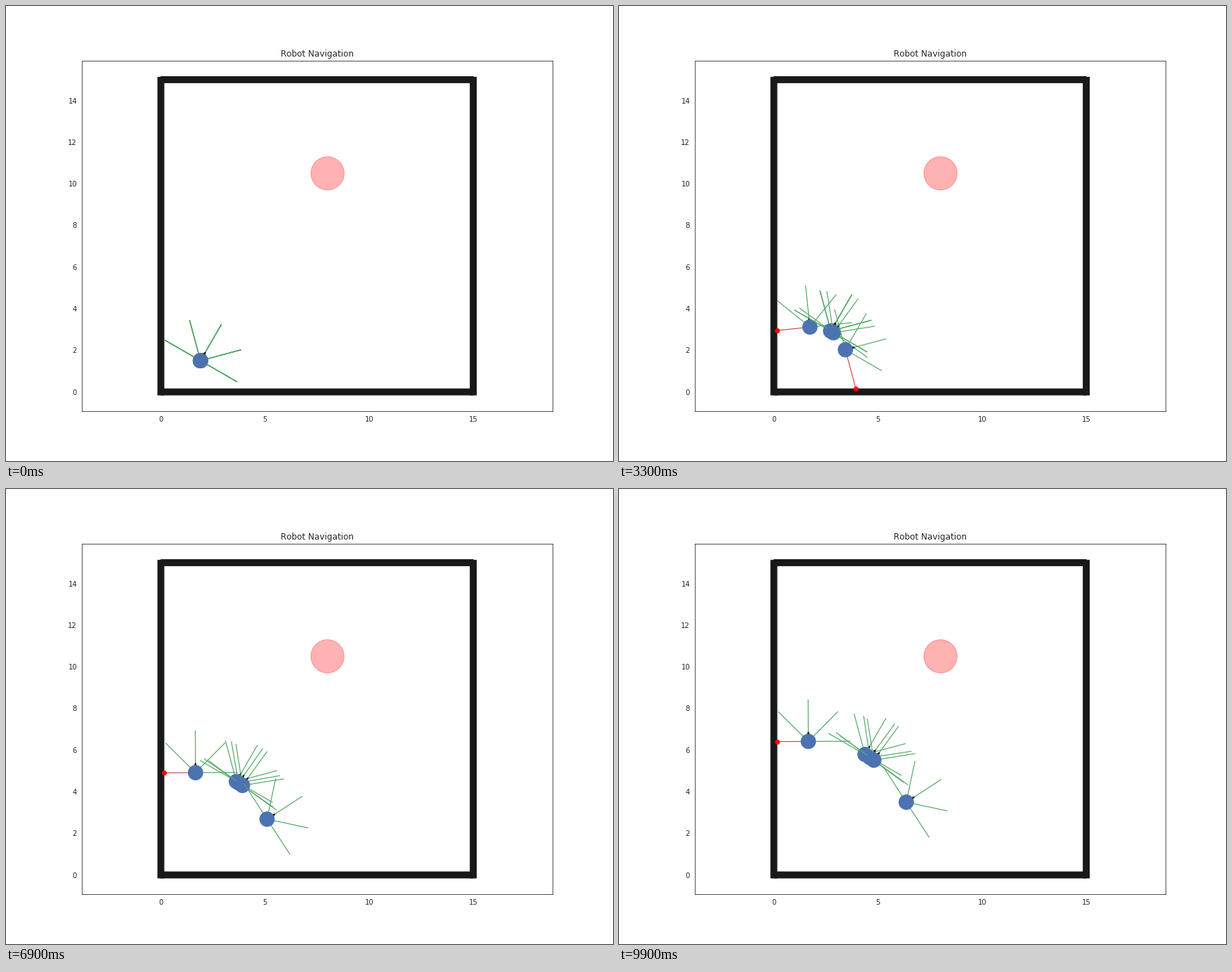
Recreate the animation shown at these times as a matplotlib script. Size 864 px wide and 648 px high, loop 10 s.

```python
import numpy as np
import matplotlib.pyplot as plt
from matplotlib.animation import FuncAnimation
from matplotlib.patches import Circle, Polygon, Rectangle

FRAMES, INTERVAL = 100, 100
START, SPEED = (1.9, 1.5), 0.05
RADIUS, REACH, WALL = 0.35, 2.0, 0.15
SENSORS = np.radians([-90, -45, 0, 45, 90])
BLUE, GREEN, RED, INK = "#4c72b0", "#55a868", "#c44e52", "0.15"

# Steering of each robot: (step, heading in degrees)
STEERING = [
    [(0, 60), (6, 102), (13, 102), (33, 96), (42, 96), (47, 90.3)],
    [(0, 60)],
    [(0, 60), (5, 58.5), (13, 58.5), (22, 60), (36, 60), (46, 56), (99, 53.5)],
    [(0, 60), (4, 54)],
    [(0, 60), (5, 15), (47, 15), (53, 21), (60, 30), (69, 33)],
]

plt.rcParams.update({"font.family": "DejaVu Sans", "text.color": INK,
                     "text.kerning_factor": 6,
                     "axes.edgecolor": INK, "axes.linewidth": 0.8})


def drive(keys):
    """Headings and positions for every step."""
    steps, angles = zip(*keys)
    heading = np.radians(np.interp(np.arange(FRAMES), steps, angles))
    moves = SPEED * np.column_stack([np.cos(heading), np.sin(heading)])
    path = np.vstack([START, START + np.cumsum(moves[:-1], axis=0)])
    return heading, path


def cast(pos, angle):
    """End point of a sensor ray and whether it meets a wall."""
    ray = REACH * np.array([np.cos(angle), np.sin(angle)])
    cut = 1.0
    for axis in (0, 1):
        if pos[axis] + ray[axis] < WALL:
            cut = min(cut, (WALL - pos[axis]) / ray[axis])
    return pos + cut * ray, cut < 1


class Robot:
    def __init__(self, ax, keys, z):
        self.heading, self.path = drive(keys)
        self.rays = [ax.plot([], [], lw=1.2, zorder=z)[0] for _ in SENSORS]
        self.hits, = ax.plot([], [], "o", color="red", ms=6, mew=1, zorder=z + 0.1)
        self.arrow = ax.add_patch(Polygon(np.zeros((3, 2)), fc="black", ec="black",
                                          lw=1, zorder=z + 0.2))
        self.body = ax.add_patch(Circle(START, RADIUS, fc=BLUE, ec=BLUE,
                                        lw=1, zorder=z + 0.3))

    def pose(self, step):
        pos, head = self.path[step], self.heading[step]
        hits = []
        for line, offset in zip(self.rays, SENSORS):
            end, hit = cast(pos, head + offset)
            line.set_data(*zip(pos, end))
            line.set_color(RED if hit else GREEN)
            if hit:
                hits.append(end)
        self.hits.set_data(*(zip(*hits) if hits else ([], [])))
        ahead = np.array([np.cos(head), np.sin(head)])
        side = np.array([-ahead[1], ahead[0]])
        base = pos + RADIUS * ahead
        self.arrow.set_xy([base + 0.045 * side, pos + 0.46 * ahead, base - 0.045 * side])
        self.body.center = pos


fig, ax = plt.subplots(figsize=(12, 9), dpi=72)
fig.subplots_adjust(left=0.125, right=0.9, bottom=0.11, top=0.88)
half = 16.83 / 2 * (0.775 * 12) / (0.77 * 9)
ax.set_xlim(7.5 - half, 7.5 + half)
ax.set_ylim(-0.915, 15.915)
ax.set_xticks(range(0, 16, 5))
ax.set_yticks(range(0, 15, 2))
ax.tick_params(length=0, pad=7, labelsize=10, labelcolor=INK)
ax.set_title("Robot Navigation", fontsize=12)

for edge in (0, 15):
    for xy, w, h in (((edge - WALL, -WALL), 2 * WALL, 15.27),
                     ((0, edge - WALL), 15, 2 * WALL)):
        ax.add_patch(Rectangle(xy, w, h, fc="#191919", ec="#191919", lw=1, snap=False))
ax.add_patch(Circle((8, 10.5), 0.8, color="red", alpha=0.3, lw=1))

robots = [Robot(ax, keys, 3 + i) for i, keys in enumerate(STEERING)]


def update(step):
    for robot in robots:
        robot.pose(step)
    return []


anim = FuncAnimation(fig, update, frames=FRAMES, interval=INTERVAL,
                     repeat=True, repeat_delay=0)
plt.show()
```
